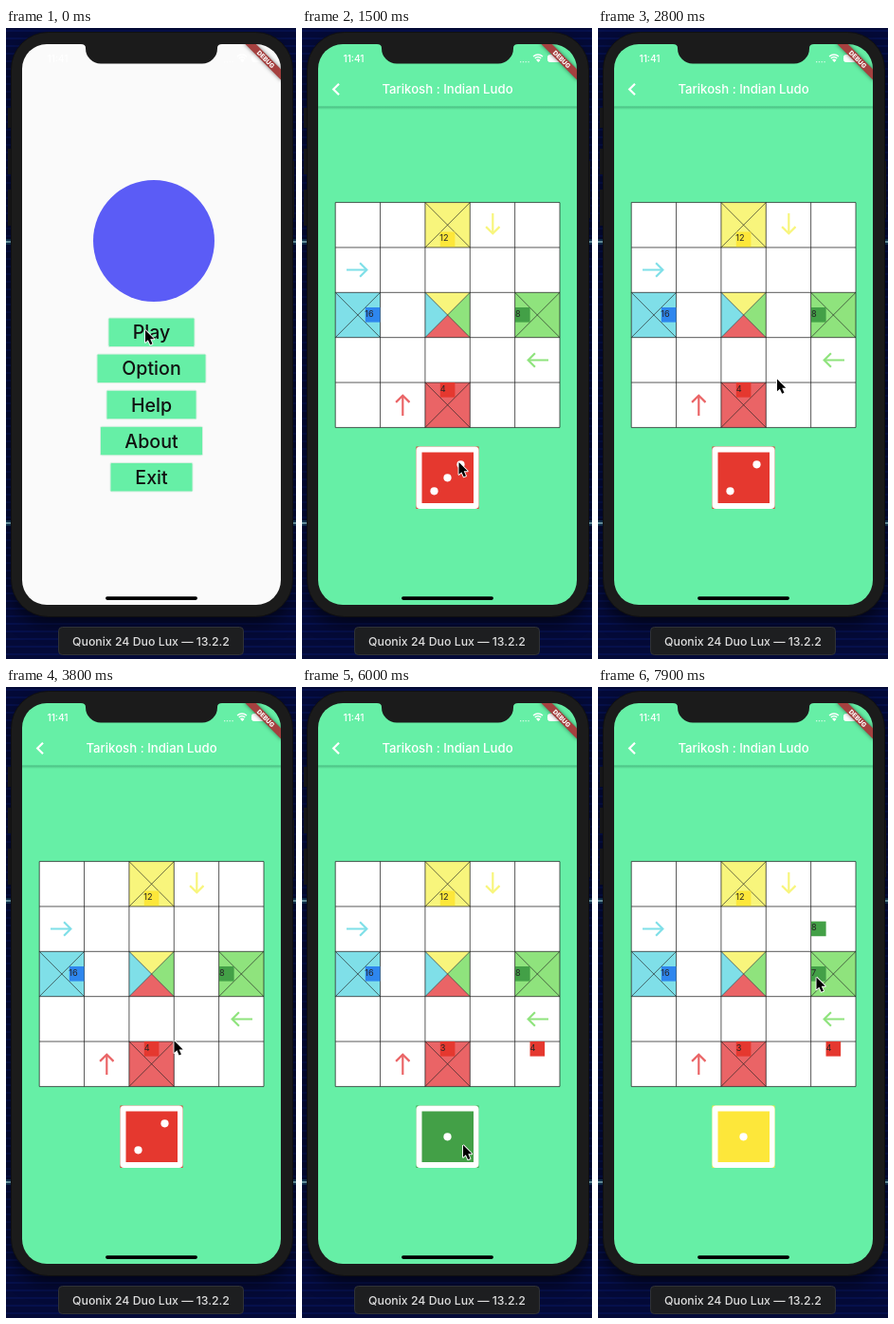
Animation, 306 px wide and 664 px high, one loop 8 s. Source, as an HTML page with a canvas:

```html
<!DOCTYPE html>
<html lang="en">
<head>
<meta charset="utf-8">
<title>Board game demo</title>
<style>
html, body { margin: 0; width: 100%; height: 100%; overflow: hidden; background: #04072a; }
canvas { display: block; }
</style>
</head>
<body>
<canvas id="stage" width="306" height="664"></canvas>
<script>
const c = document.getElementById('stage').getContext('2d');
const LOOP = 8000;
const MINT = '#66efa6', RED = '#e5382f', GREEN = '#43a047', YELLOW = '#fde73a', BLUE = '#2e86ee';
const PALE = { yellow: '#f8f57c', green: '#8fe37d', red: '#ea6466', cyan: '#7fdfe8' };
const X0 = 35.2, Y0 = 183.6, CELL = 47.36, SIZE = 5 * CELL;

function rect(x, y, w, h, fill) {
  c.fillStyle = fill;
  c.fillRect(x, y, w, h);
}

function round(x, y, w, h, r, fill, stroke) {
  c.beginPath();
  c.roundRect(x, y, w, h, r);
  if (fill) { c.fillStyle = fill; c.fill(); }
  if (stroke) { c.strokeStyle = stroke; c.lineWidth = 1; c.stroke(); }
}

function disc(x, y, r, fill) {
  c.beginPath();
  c.arc(x, y, r, 0, 7);
  c.fillStyle = fill;
  c.fill();
}

function line(points, color, width = 1) {
  c.beginPath();
  points.forEach(([x, y]) => c.lineTo(x, y));
  c.strokeStyle = color;
  c.lineWidth = width;
  c.stroke();
}

function polygon(points, fill) {
  c.beginPath();
  points.forEach(([x, y]) => c.lineTo(x, y));
  c.closePath();
  c.fillStyle = fill;
  c.fill();
}

function text(s, x, y, size, color, weight = 400, align = 'center') {
  c.font = `${weight} ${size}px Inter, sans-serif`;
  c.textAlign = align;
  c.fillStyle = color;
  c.fillText(s, x, y);
}

function backdrop() {
  rect(0, 0, 306, 664, '#040a38');
  for (let y = 2; y < 664; y += 8) rect(0, y, 306, 2, '#06104c');
  for (const y of [222, 518]) {
    rect(0, y, 306, 6, '#12385c');
    rect(0, y + 2, 306, 2, '#7fb4c4');
  }
}

function phoneBody() {
  for (const [y, h] of [[84, 21], [127, 27], [170, 38]]) rect(2, y, 5, h, '#1d1d1f');
  rect(299, 140, 5, 60, '#1d1d1f');
  c.save();
  c.shadowColor = 'rgba(0,0,0,.6)';
  c.shadowBlur = 18;
  c.shadowOffsetY = 8;
  round(5.5, 4.5, 297, 615, 39, '#1b1b1b');
  c.restore();
  round(5.5, 4.5, 297, 615, 39, null, '#101011');
}

function caption() {
  round(55.5, 630.5, 195, 29, 4, '#1d1e20', '#303236');
  text('Quonix 24 Duo Lux — 13.2.2', 153, 650, 12.3, '#dedede', 500);
}

function menu() {
  rect(17, 17, 273, 590, '#fafafa');
  disc(156, 224, 64, '#5b5cf6');
  const items = [['Play', 91], ['Option', 115], ['Help', 95], ['About', 108], ['Exit', 87]];
  items.forEach(([label, w], i) => {
    const y = 305 + i * 38.1;
    round(153.5 - w / 2, y, w, 30.5, 1.5, MINT, '#d9efe2');
    text(label, 153.5, y + 22.3, 19.6, '#111', 500);
  });
}

function cross(col, row, fill) {
  const x = X0 + col * CELL, y = Y0 + row * CELL, e = CELL;
  if (fill) rect(x, y, e, e, fill);
  line([[x, y], [x + e, y + e]], '#222', 0.66);
  line([[x + e, y], [x, y + e]], '#222', 0.66);
}

function arrow(x, y, angle, color) {
  c.save();
  c.translate(x, y);
  c.rotate(angle * Math.PI / 2);
  line([[-11.5, 0], [9.8, 0]], color, 2.2);
  line([[2.6, -7.2], [9.8, 0], [2.6, 7.2]], color, 2.2);
  c.restore();
}

function token(label, x, y, fill, dx = 0) {
  rect(x, y, 15.6, 15.6, fill);
  text(label, x + dx, y + 9.5, 9.2, '#262626', 400, 'left');
}

function board(t) {
  rect(X0, Y0, SIZE, SIZE, '#fff');
  cross(2, 0, PALE.yellow);
  cross(0, 2, PALE.cyan);
  cross(4, 2, PALE.green);
  cross(2, 4, PALE.red);

  const a = X0 + 2 * CELL, b = a + CELL, top = Y0 + 2 * CELL, end = top + CELL;
  const mid = [(a + b) / 2, (top + end) / 2];
  polygon([[a, top], [b, top], mid], PALE.yellow);
  polygon([[b, top], [b, end], mid], PALE.green);
  polygon([[a, end], [b, end], mid], PALE.red);
  polygon([[a, top], [a, end], mid], PALE.cyan);
  cross(2, 2);

  for (let i = 0; i < 6; i++) {
    const x = X0 + i * CELL, y = Y0 + i * CELL;
    line([[x, Y0], [x, Y0 + SIZE]], '#222', 0.75);
    line([[X0, y], [X0 + SIZE, y]], '#222', 0.75);
  }
  arrow(58.5, 254.5, 0, PALE.cyan);
  arrow(201.3, 206.5, 1, PALE.yellow);
  arrow(106.3, 396.5, 3, PALE.red);
  arrow(248.5, 349.5, 2, PALE.green);

  const redStep = t < 4800 ? 0 : t < 5200 ? 1 : 2;
  const greenOut = t >= 7400;
  token('12', 145.8, 214.5, YELLOW, -0.5);
  token('16', 66.8, 294, BLUE, -0.5);
  token(greenOut ? '7' : '8', 225, 294, GREEN);
  token(redStep ? '3' : '4', 145.8, 373, RED);
  if (redStep) token('4', 145.8 + redStep * CELL, 373, RED);
  if (greenOut) token('8', 225, 294 - CELL, GREEN);
}

function diceFace(t) {
  if (t < 1800) return 3;
  if (t < 2000) return t < 1900 ? 1 : 4;
  if (t < 5700) return 2;
  return t < 5900 ? 3 : 1;
}

function dice(t) {
  const color = t < 5250 ? RED : t < 7450 ? GREEN : YELLOW;
  const n = diceFace(t), d = 14;
  rect(120.5, 440.5, 66, 65.5, color);
  round(120.5, 440.5, 66, 65.5, 4, '#fff');
  rect(126.5, 446.5, 54.5, 53.5, color);
  const spots = [];
  if (n % 2) spots.push([0, 0]);
  if (n > 1) spots.push([-1, 1], [1, -1]);
  if (n > 3) spots.push([-1, -1], [1, 1]);
  for (const [i, j] of spots) disc(153.5 + i * d, 473.3 + j * d, 4.1, '#fff');
}

function game(t) {
  rect(17, 17, 273, 590, MINT);
  const shade = c.createLinearGradient(0, 82, 0, 86);
  shade.addColorStop(0, 'rgba(0,60,35,.35)');
  shade.addColorStop(1, 'rgba(0,60,35,0)');
  rect(17, 82.5, 273, 4, shade);
  line([[39, 58.8], [33.2, 64.5], [39, 70.2]], '#fff', 2.2);
  text('Tarikosh : Indian Ludo', 153.5, 69, 13.2, '#fff', 500);
  board(t);
  dice(t);
}

function statusBar() {
  text('11:41', 54.5, 36, 10.2, '#fff', 500);
  for (let i = 0; i < 4; i++) rect(230 + i * 2.8, 35, 1.3, 1.3, 'rgba(255,255,255,.7)');
  for (const r of [7.4, 4.8, 2.2]) {
    c.beginPath();
    c.arc(249, 35.5, r, -2.3, -0.84);
    if (r < 3) { c.lineTo(249, 35.5); c.fillStyle = '#fff'; c.fill(); }
    c.strokeStyle = '#fff';
    c.lineWidth = 1.5;
    c.stroke();
  }
  round(259.5, 28.5, 14, 7, 2, '#fff', '#fff');
}

function banner() {
  c.save();
  c.translate(290, 17);
  c.rotate(Math.PI / 4);
  c.shadowColor = 'rgba(0,0,0,.5)';
  c.shadowBlur = 4;
  rect(-28, 18.5, 56, 8, '#a5403f');
  c.shadowBlur = 0;
  text('DEBUG', 0, 24.9, 6.6, '#fff', 800);
  c.restore();
}

function notch() {
  c.beginPath();
  c.moveTo(79, 16);
  c.lineTo(79, 17);
  c.quadraticCurveTo(84, 17, 84, 21);
  c.arcTo(84, 37.5, 102, 37.5, 16);
  c.arcTo(223, 37.5, 223, 21, 16);
  c.lineTo(223, 21);
  c.quadraticCurveTo(223, 17, 228, 17);
  c.lineTo(228, 16);
  c.fillStyle = '#1b1b1b';
  c.fill();
}

// Pointer stops: time, x, y
const path = [
  [0, 147, 318], [950, 147, 318], [1450, 165.5, 457], [2150, 165.5, 457], [2700, 189, 369.5],
  [3500, 189, 369.5], [4300, 152.5, 378], [5050, 152.5, 378], [5550, 170, 482],
  [6250, 170, 482], [6950, 230.5, 305.5], [8000, 230.5, 305.5]
];
const smooth = p => p * p * (3 - 2 * p);

function pointer(t) {
  const i = path.findIndex(stop => stop[0] > t);
  const [t0, x0, y0] = path[i - 1], [t1, x1, y1] = path[i];
  const p = smooth((t - t0) / (t1 - t0));
  c.save();
  c.translate(x0 + (x1 - x0) * p, y0 + (y1 - y0) * p);
  c.scale(0.9, 0.9);
  const shape = [[0, 0], [0, 14.2], [3.2, 11.3], [5.8, 17], [8.3, 15.9], [5.8, 10.3], [10.3, 10.3]];
  c.lineJoin = 'round';
  line([...shape, [0, 0]], '#fff', 2);
  polygon(shape, '#000');
  c.restore();
}

function draw(now) {
  const t = now % LOOP;
  backdrop();
  phoneBody();
  caption();
  c.save();
  c.beginPath();
  c.roundRect(17, 17, 273, 590, 26);
  c.clip();

  const p = 1 - (1 - Math.min(1, Math.max(0, (t - 950) / 400))) ** 3;
  if (p < 1) {
    c.save();
    c.translate(-91 * p, 0);
    menu();
    c.restore();
  }
  if (p > 0) {
    c.save();
    c.translate(273 * (1 - p), 0);
    game(t);
    c.restore();
  }
  statusBar();
  banner();
  round(105, 598.3, 97, 3.6, 1.8, '#000');
  c.restore();
  notch();
  pointer(t);
}

let start;
function tick(now) {
  start ??= now;
  draw(now - start);
  requestAnimationFrame(tick);
}
requestAnimationFrame(tick);
</script>
</body>
</html>
```
